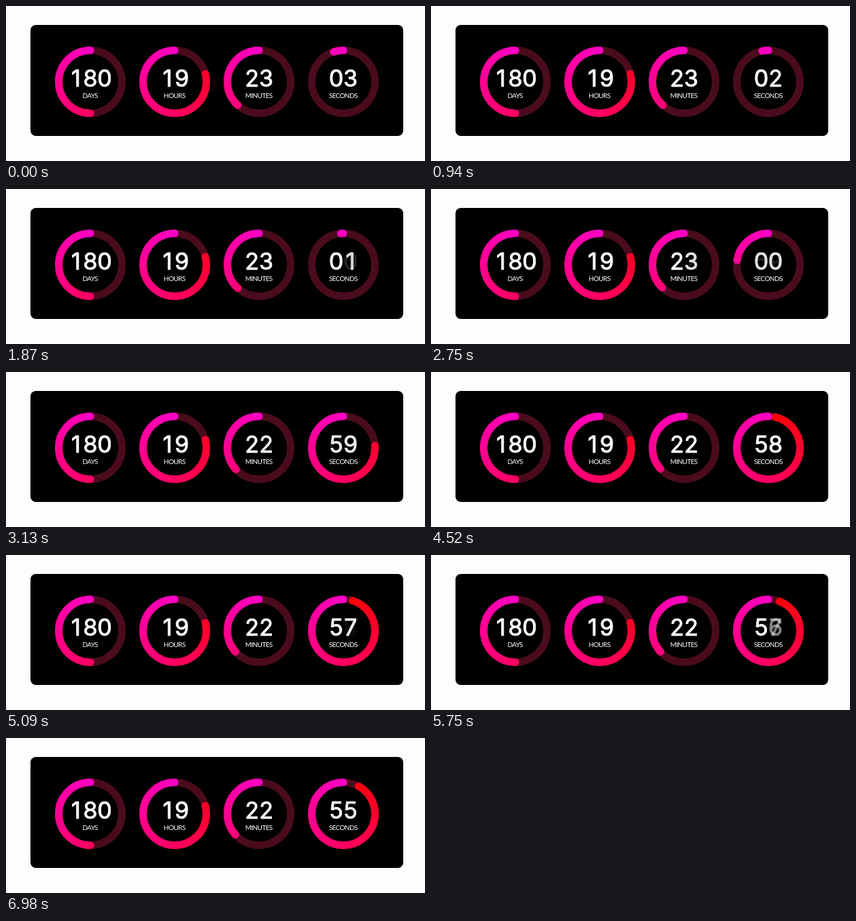
An HTML page with a canvas for the animation above (7.08 s loop, 616 by 229 pixels).

```html
<!DOCTYPE html>
<html lang="en">
<head>
<meta charset="utf-8">
<title>Countdown rings</title>
<style>
  html, body { margin: 0; width: 100%; height: 100%; overflow: hidden; background: #fdfdfd; }
  .card { position: absolute; left: 36px; top: 28px; width: 548px; height: 164px; border-radius: 8px; background: #000; }
  canvas, svg { position: absolute; left: 0; top: 0; width: 616px; height: 229px; }
  text { fill: #fff; text-anchor: middle; }
  .digit { font: 400 34px Inter, "Open Sans", sans-serif; stroke: #fff; stroke-width: .9px; stroke-linejoin: round; }
  .label { font: 400 10px Lato, sans-serif; letter-spacing: -.6px; }
</style>
</head>
<body>
<div class="card"></div>
<canvas></canvas>
<svg viewBox="0 0 616 229"></svg>
<script>
const LOOP = 7080, FADE = 700, TAU = 310;
const CY = 112, RADIUS = 46.5, WIDTH = 11, PITCH = 21;
const TOP = -Math.PI / 2, TURN = Math.PI * 2, PINK = 195;

const secondTicks = [[20, 2], [890, 1], [1780, 0], [2670, 59], [3640, 58], [4600, 57], [5540, 56], [6510, 55]];
const units = [
  { label: "DAYS", x: 124, max: 360, from: 180, ticks: [] },
  { label: "HOURS", x: 248, max: 24, from: 19, ticks: [] },
  { label: "MINUTES", x: 372, max: 60, from: 23, ticks: [[2670, 22]] },
  { label: "SECONDS", x: 496, max: 60, from: 3, ticks: secondTicks }
];

const svg = document.querySelector("svg");
const canvas = document.querySelector("canvas");
const ctx = canvas.getContext("2d");
const scale = window.devicePixelRatio || 1;
canvas.width = 616 * scale;
canvas.height = 229 * scale;
ctx.scale(scale, scale);

function addText(kind, x, y, content = "") {
  const el = document.createElementNS("http://www.w3.org/2000/svg", "text");
  el.setAttribute("class", kind);
  el.setAttribute("x", x);
  el.setAttribute("y", y);
  el.textContent = content;
  return svg.appendChild(el);
}

const pad = n => String(n).padStart(2, "0");

for (const unit of units) {
  const count = pad(unit.from).length;
  unit.slots = Array.from({ length: count }, (_, i) => {
    const x = unit.x + (i - (count - 1) / 2) * PITCH;
    return { old: addText("digit", x, 118.7), now: addText("digit", x, 118.7) };
  });
  addText("label", unit.x - .3, 136.3, unit.label);
}

// cubic-bezier(.25, .1, .25, 1)
function ease(p) {
  if (p <= 0) return 0;
  if (p >= 1) return 1;
  const curve = (a, b, u) => 3 * a * u * (1 - u) ** 2 + 3 * b * u * u * (1 - u) + u ** 3;
  let lo = 0, hi = 1;
  for (let i = 0; i < 20; i++) {
    const mid = (lo + hi) / 2;
    if (curve(.25, .25, mid) < p) lo = mid; else hi = mid;
  }
  return curve(.1, 1, lo);
}

function stateAt(unit, time) {
  let old = unit.from, now = unit.from, level = unit.from, since = -Infinity;
  unit.ticks.forEach(([start, value], i) => {
    if (time < start) return;
    const next = unit.ticks[i + 1];
    const end = next ? Math.min(time, next[0]) : time;
    level = value + (level - value) * Math.exp((start - end) / TAU);
    old = now;
    now = value;
    since = start;
  });
  return { old, now, level, mix: ease((time - since) / FADE) };
}

const shade = part => `rgb(255, 0, ${Math.round(PINK * (1 - part))})`;

function drawCap(x, angle, color) {
  ctx.fillStyle = color;
  ctx.beginPath();
  ctx.arc(x + RADIUS * Math.cos(angle), CY + RADIUS * Math.sin(angle), WIDTH / 2, 0, TURN);
  ctx.fill();
}

function drawRing(x, part) {
  const end = TOP - part * TURN;
  ctx.lineWidth = WIDTH;
  ctx.strokeStyle = "#4a0c1c";
  ctx.beginPath();
  ctx.arc(x, CY, RADIUS, 0, TURN);
  ctx.stroke();

  const gradient = ctx.createConicGradient(TOP, x, CY);
  gradient.addColorStop(0, shade(1));
  gradient.addColorStop(1, shade(0));
  ctx.strokeStyle = gradient;
  ctx.beginPath();
  ctx.arc(x, CY, RADIUS, TOP, end, true);
  ctx.stroke();

  drawCap(x, end, shade(part));
  drawCap(x, TOP, shade(0));
}

function drawDigits(unit, { old, now, mix }) {
  const before = pad(old), after = pad(now);
  unit.slots.forEach((slot, i) => {
    const changed = before[i] !== after[i];
    slot.old.textContent = changed ? before[i] : "";
    slot.now.textContent = after[i];
    slot.old.style.opacity = 1 - mix;
    slot.now.style.opacity = changed ? mix : 1;
  });
}

const began = performance.now();
function render() {
  const time = (performance.now() - began) % LOOP;
  ctx.clearRect(0, 0, 616, 229);
  for (const unit of units) {
    const state = stateAt(unit, time);
    drawRing(unit.x, state.level / unit.max);
    drawDigits(unit, state);
  }
  requestAnimationFrame(render);
}
render();
</script>
</body>
</html>
```
